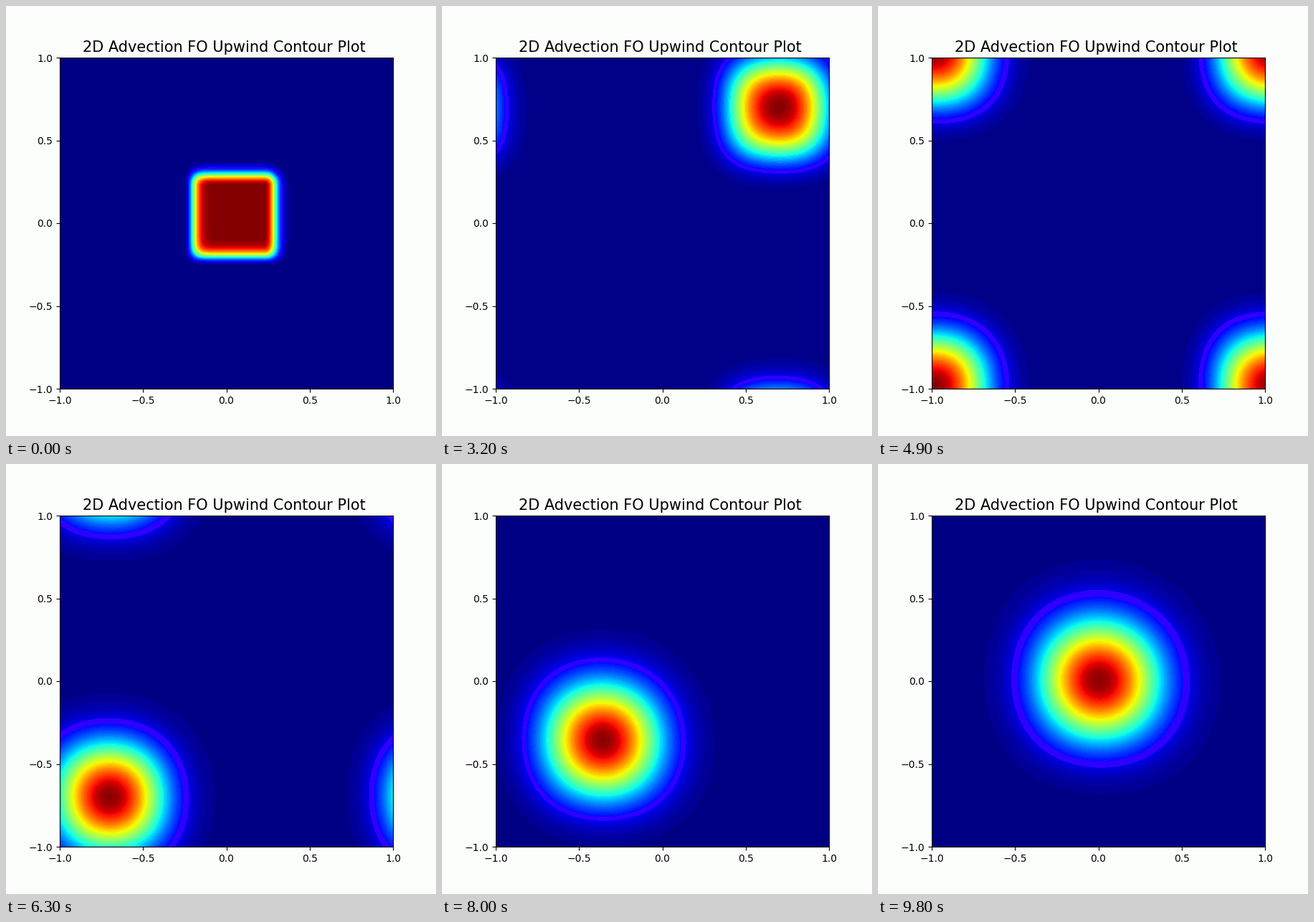
Animation of 600x600 px, one loop 9.9 s. Source, as a matplotlib script:

```python
import numpy as np
import matplotlib.pyplot as plt
from matplotlib.animation import FuncAnimation
from matplotlib.colors import ListedColormap

POINTS = 100
CFL = 0.025
FIRST_STEP = 100
STEPS_PER_FRAME = 40
FRAMES = 99
LEVELS = 80
PAPER = "#fcfefc"


def advance(u, steps):
    """First-order upwind steps on a periodic grid."""
    for _ in range(steps):
        flow_x = u - np.roll(u, 1, axis=1)
        flow_y = u - np.roll(u, 1, axis=0)
        u = u - CFL * (flow_x + flow_y)
    return u


def solve():
    inside = np.abs(x) <= 0.25
    u = advance(np.outer(inside, inside).astype(float), FIRST_STEP)
    states = [u]
    while len(states) < FRAMES:
        u = advance(u, STEPS_PER_FRAME)
        states.append(u)
    return states


def make_cmap():
    """Jet with a violet band where blue is at its brightest."""
    colors = plt.get_cmap("jet", 256)(np.arange(256))
    colors[25:33, :3] = 0.18, 0, 1
    return ListedColormap(colors)


x = np.linspace(-1, 1, POINTS)
states = solve()
cmap = make_cmap()

fig, ax = plt.subplots(figsize=(6, 6), dpi=100, facecolor=PAPER)
ax.set_title("2D Advection FO Upwind Contour Plot", fontsize=15, x=0.4937)
ticks = np.linspace(-1, 1, 5)
ax.set(xlim=(-1, 1), ylim=(-1, 1), xticks=ticks, yticks=ticks)


def clear():
    for item in list(ax.collections):
        item.remove()
    return []


def draw(i):
    clear()
    ax.contourf(x, x, states[i], LEVELS, cmap=cmap)
    return list(ax.collections)


anim = FuncAnimation(fig, draw, frames=FRAMES, init_func=clear,
                     interval=100, repeat=True, repeat_delay=0)
plt.show()
```
